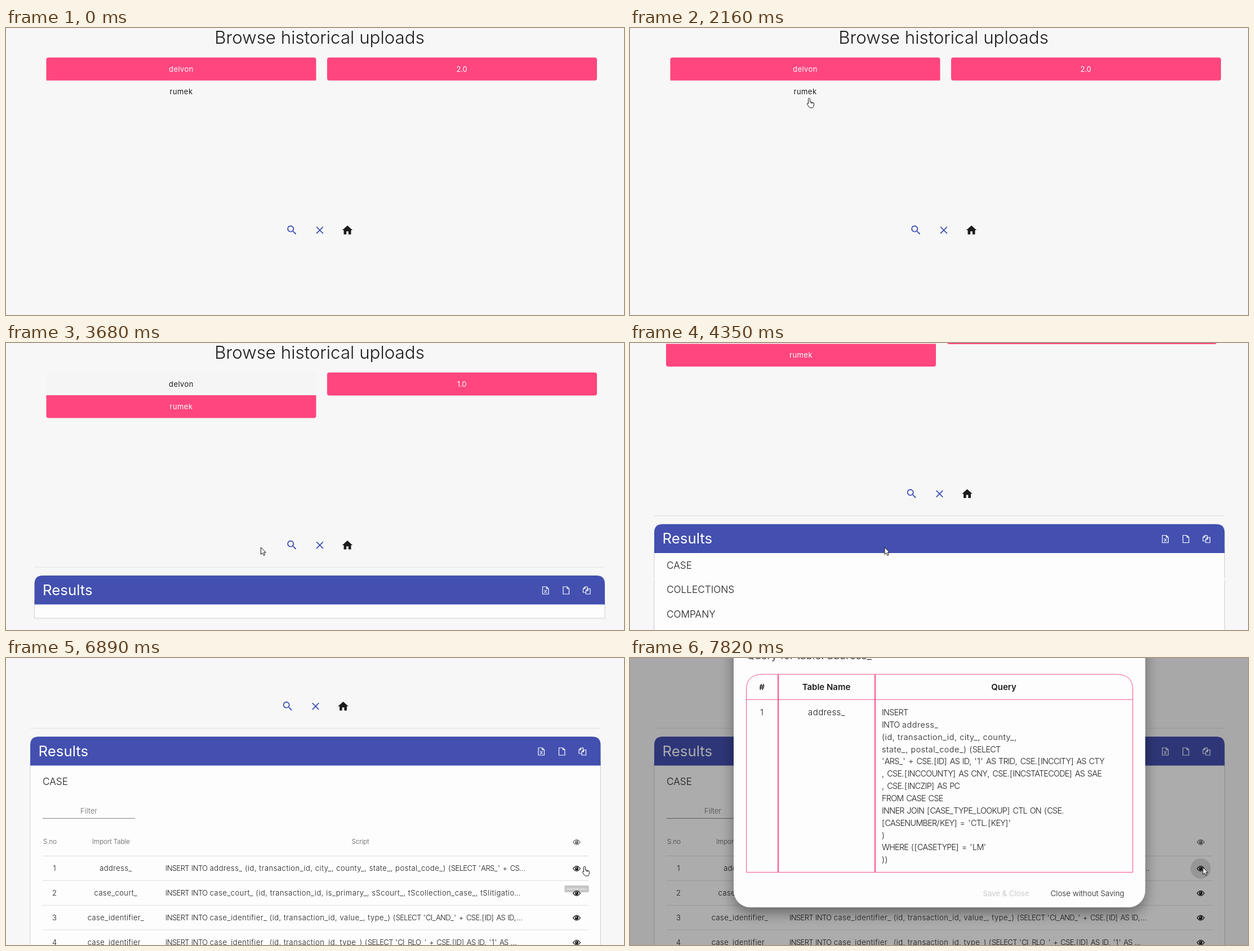
These frames come from a looping animation (1097 px wide and 511 px high, 8000 ms). An HTML page:

```html
<!DOCTYPE html>
<html lang="en">
<head>
<meta charset="utf-8">
<title>Upload history</title>
<style>
  html, body { margin: 0; width: 100%; height: 100%; overflow: hidden; background: #f7f7f7; }
  svg { display: block; width: 1097px; height: 511px; font: 300 13px Inter, "Open Sans", sans-serif; fill: #1c1c1c; }
  .mid { text-anchor: middle; }
  .pink { fill: #ff467e; }
  .title { font-size: 31.3px; }
  .card { font-size: 13px; font-weight: 400; letter-spacing: .45px; }
  .on { fill: #fff; }
  .tight { letter-spacing: -.2px; }
  .results { font-size: 25.8px; font-weight: 400; fill: #fff; }
  .row { font-size: 17.2px; }
  .name { letter-spacing: .45px; }
  .filter { fill: #6a6a6a; }
  .head { font-size: 11.5px; fill: #555; }
  .code { letter-spacing: .04em; }
  .code tspan { letter-spacing: -.05em; }
  .sql { font-size: 14.4px; }
  .line { stroke: #dedede; fill: none; }
  .icon { fill: none; stroke: #fff; stroke-width: 1.2; }
  .tip text { font-size: 9.5px; font-weight: 400; fill: #fff; text-anchor: middle; }
  .tip rect { fill: #616161; }
  .frame { fill: none; stroke: #f8508a; }
  .query { font-size: 19px; }
  .cell { font-size: 15px; }
  .strong { font-size: 15px; font-weight: 600; }
  .button { font-size: 13.4px; }
  .off { fill: #bdbdbd; }
  .cursor path { fill: #fff; stroke: #111; stroke-linejoin: round; }
</style>
</head>
<body>
<svg id="stage" viewBox="0 0 1097 511"></svg>
<script>
const text = (x, y, s, cls = '') => `<text x="${x}" y="${y}" class="${cls}">${s}</text>`;
const rect = (x, y, w, h, attrs = '') => `<rect x="${x}" y="${y}" width="${w}" height="${h}" ${attrs}/>`;
const path = (d, attrs = '') => `<path d="${d}" ${attrs}/>`;
const group = (id, body, attrs = '') => `<g id="${id}" ${attrs}>${body}</g>`;
// Capitals are set tighter than the rest of a statement.
const code = (x, y, s, cls = '') => text(x, y, s.replace(/[A-Z]{2,}/g, '<tspan>$&</tspan>'), 'code ' + cls);
const tip = (id, w, label) => group(id, rect(-w / 2, 0, w, 24, 'rx="4"') + text(0, 15.4, label), 'class="tip"');
const eye = (y, color) => `<g transform="translate(1013 ${y})" fill="${color}">` +
  path('M-6.4 0Q0 -8.6 6.4 0Q0 8.6 -6.4 0z', `fill="none" stroke="${color}" stroke-width="1.2"`) +
  '<circle r="3.1"/><circle cx="-.8" cy="-1" r=".9" fill="#fff"/></g>';
const sheet = 'M-5 -6.5H2L5.5 -3V6.5H-5zM2 -6.5V-3H5.5';

const ROW = 43.85, TOP = 191.5;
const topics = ['COLLECTIONS', 'COMPANY', 'COURTS', 'DEBTOR_PAYMENTS', 'EVENT', 'INSURANCE', 'PARTIES'];
const scripts = [
  ['address_', "(id, transaction_id, city_, county_, state_, postal_code_) (SELECT 'ARS_' + CS…"],
  ['case_court_', '(id, transaction_id, is_primary_, sScourt_, tScollection_case_, tSlitigatio…'],
  ['case_identifier_', "(id, transaction_id, value_, type_) (SELECT 'CI_AND_' + CSE.[ID] AS ID,…"],
  ['case_identifier_', "(id, transaction_id, type_) (SELECT 'CI_RLO_' + CSE.[ID] AS ID, '1' AS …"]
];
const query = [
  'INSERT', 'INTO address_', '(id, transaction_id, city_, county_,', 'state_, postal_code_) (SELECT',
  "'ARS_' + CSE.[ID] AS ID, '1' AS TRID, CSE.[INCCITY] AS CTY",
  ', CSE.[INCCOUNTY] AS CNY, CSE.[INCSTATECODE] AS SAE', ', CSE.[INCZIP] AS PC', 'FROM CASE CSE',
  'INNER JOIN [CASE_TYPE_LOOKUP] CTL ON (CSE.', "[CASENUMBER/KEY] = 'CTL.[KEY]'", ')',
  "WHERE ([CASETYPE] = 'LM'", '))'
];

const roundTop = 'M71.5 93.5V56.5q0 -4 4 -4H546.5q4 0 4 4V93.5z';
const roundBottom = 'M71.5 93V129.5q0 4 4 4H546.5q4 0 4 -4V93z';
const names = (a, b) => text(311, 77.5, 'delvon', 'mid card ' + a) + text(311, 117.5, 'rumek', 'mid card ' + b);

const uploads =
  text(556.5, 28, 'Browse historical uploads', 'mid title') +
  group('first', path(roundTop, 'class="pink"') + names('on', '')) +
  group('second', path(roundTop, 'fill="#f5f5f5"') + path(roundBottom, 'class="pink"') + names('', 'on')) +
  rect(570, 52.5, 479, 41, 'rx="4" class="pink"') +
  text(809, 77.5, '2.0', 'mid card on tight" id="version') +
  '<circle id="press" cx="507" cy="360" r="17" fill="#000" opacity=".06"/>' +
  path('M15.5 14h-.79l-.28-.27A6.5 6.5 0 1 0 9.5 16c1.61 0 3.09-.59 4.23-1.57l.27.28v.79l5 4.99L20.49 19zm-6 0a4.5 4.5 0 1 1 0-9 4.5 4.5 0 0 1 0 9z',
    'fill="#3f51b5" transform="translate(496.5 348.8) scale(.92)"') +
  path('M551.2 354.2l11.6 11.6m0 -11.6l-11.6 11.6', 'stroke="#3f51b5" stroke-width="1.8"') +
  path('M10 20v-6h4v6h5v-8h3L12 3 2 12h3v8z', 'transform="translate(595 349) scale(.92)"');

const table =
  text(147, 276.5, 'Filter', 'mid filter') + path('M65 285.5H229', 'stroke="#858585"') +
  text(78, 331, 'S.no', 'mid head') + text(186.5, 331, 'Import Table', 'mid head') + text(629, 331, 'Script', 'mid head') +
  eye(328, '#666') +
  scripts.map(([name, rest], i) => {
    const y = 375 + i * ROW;
    return path(`M65 ${y - 22.5}H1034`, 'class="line"') + text(86, y + 4, i + 1, 'mid') +
      text(195, y + 4, name, 'mid name') + code(283, y + 4, `INSERT INTO ${name} ${rest}`) + eye(y, '#111');
  }).join('') +
  '<circle id="ripple" cx="1013" cy="375" r="18" fill="#000" opacity=".13"/>';

const rest =
  rect(43, TOP + ROW, 1012.5, 700, 'fill="#fdfdfd"') +
  path(`M43 ${TOP + ROW + 5}V900M1055.5 ${TOP + ROW + 5}V900`, 'stroke="#cfcfcf"') +
  topics.map((s, i) => text(65, TOP + ROW * (i + 1) + 27.5, s, 'row')).join('') +
  path(`M43 ${TOP + ROW - 3}q0 3 3 3H1052.5q3 0 3 -3`, 'id="edge" fill="none" stroke="#aaa"');

const results =
  path('M43 125H1055.5', 'class="line"') +
  '<rect id="sheet" x="43" y="185" width="1012.5" fill="#fdfdfd" stroke="#cfcfcf"/>' +
  group('list', group('table', table) + text(65, 219, 'CASE', 'row" id="case') + group('rest', rest) +
    rect(43, TOP, 1012.5, ROW, 'id="hover" fill="#000" opacity=".03"')) +
  path('M43 191.5V155q0 -15 15 -15H1040.5q15 0 15 15V191.5z', 'fill="#4350af"') +
  text(57.5, 174.5, 'Results', 'results') +
  '<g class="icon">' + path(sheet + 'M-2 -1L2.4 4.5M2.4 -1L-2 4.5', 'transform="translate(950 166.5)"') +
  path(sheet, 'transform="translate(986.5 166.5)"') +
  path('M1.5 -3V-6.5H-2.5L-6 -3V3.5H-1M-2.5 -6.5V-3H-6M2.5 -3H6.5V6.5H-1V.5zM2.5 -3V.5H-1', 'transform="translate(1023 166.5)"') + '</g>';

const modal =
  rect(184, -70, 730.5, 514, 'rx="30" fill="#fdfdfd" filter="url(#shade)"') +
  text(207, 1.5, 'Query for table: address_', 'query') +
  '<g class="frame">' + path('M206.5 381.5V56q0 -27 30 -27H862.5q30 0 30 27V381.5zM206.5 74H892.5') +
  path('M263 29V381M435 29V381', 'stroke-width="2"') + '</g>' +
  text(234, 56.5, '#', 'mid strong') + text(348.5, 56.5, 'Table Name', 'mid strong') + text(663.5, 56.5, 'Query', 'mid strong') +
  text(234, 102, '1', 'mid cell') + text(349, 102, 'address_', 'mid cell name') +
  query.map((s, i) => code(447, 102 + i * 21.85, s, 'sql')).join('') +
  text(667.5, 424, 'Save &amp; Close', 'mid button off') + text(812, 424, 'Close without Saving', 'mid button');

const stage = document.getElementById('stage');
stage.innerHTML =
  '<defs><filter id="shade" x="-10%" y="-10%" width="120%" height="120%"><feDropShadow dx="0" dy="10" stdDeviation="12" flood-opacity=".4"/></filter></defs>' +
  rect(0, 0, 1097, 511, 'fill="#f7f7f7"') +
  group('page', uploads + group('results', results, 'transform="translate(7.5 274)"')) +
  tip('findTip', 79.5, 'Search history') + tip('clearTip', 74, 'Clear search') + tip('viewTip', 84, 'View/Edit query') +
  rect(0, 0, 1097, 511, 'id="veil" fill="#000"') + group('modal', modal) +
  group('cursor',
    path('M0 0V12.5l3 -2.8 2 4.6 2.2 -1 -2 -4.4H9z', 'id="arrow"') +
    path('M-1.5 10V1.5a1.5 1.5 0 0 1 3 0V6.5l5.4 1.2q1.8 .4 1.6 2.4l-.5 3.5q-.3 2.3 -1.8 3.4h-4.6q-1.2 -.4 -2.2 -2l-3 -4.4q-.4 -1.8 1.2 -1.5zM3.6 7V9.5M5.8 7.6V9.8', 'id="hand"'),
    'class="cursor"');

const el = {};
stage.querySelectorAll('[id]').forEach(n => el[n.id] = n);

const ramp = (t, a, b) => Math.min(1, Math.max(0, (t - a) / (b - a)));
const smooth = (t, a, b) => { const k = ramp(t, a, b); return k * k * (3 - 2 * k); };
const fade = (t, a, b) => Math.min(ramp(t, a, a + 150), 1 - ramp(t, b - 75, b));
const during = (t, a, b) => t >= a && t < b;
const show = (node, on) => node.style.display = on ? '' : 'none';
const move = (node, x, y, s = 1) => node.setAttribute('transform', `translate(${x} ${y}) scale(${s})`);

// Pointer stops: time, x, y.
const stops = [
  [100, 726, 186], [420, 710, 250], [640, 604, 270], [850, 452, 130], [1260, 509, 365], [1480, 509, 365],
  [1700, 546, 340], [2130, 318, 125], [2500, 318, 125], [3100, 502, 364], [3500, 502, 364], [3680, 452, 364],
  [4440, 452, 364], [4520, 424, 270], [5010, 328, 346], [5530, 324, 207], [6080, 324, 207], [6540, 1073, 338],
  [6860, 1027, 371], [7200, 1017, 373]
];

// The pointer is sampled every 110 ms.
function pointer(time) {
  const t = 40 + Math.floor((time - 40) / 110) * 110;
  const i = stops.findLastIndex(s => t >= s[0]);
  if (i < 0) return null;
  const [a, x, y] = stops[i], [b, u, v] = stops[i + 1] || [a + 1, x, y];
  const k = smooth(t, a, b);
  return [x + (u - x) * k, y + (v - y) * k];
}

function overTarget(t, [x, y]) {
  const near = (cx, cy) => Math.hypot(x - cx, y - cy) < 24;
  if (t < 3650) return near(507, 360) || near(557, 360) || (x < 550 && y < 128);
  if (t < 6080) return t > 4900 && y > TOP;
  return t < 7540 && near(1013, 375);
}

function setTip(node, x, y, k) {
  node.style.opacity = .9 * k;
  move(node, x, y, .2 + .8 * k);
}

function draw(t) {
  const swapped = t >= 2269, listed = t >= 4220;
  show(el.first, !swapped);
  show(el.second, swapped);
  el.version.textContent = swapped ? '1.0' : '2.0';
  show(el.press, during(t, 3500, 3680));
  const scroll = 91.5 * smooth(t, 4180, 4340) + 182.5 * smooth(t, 4700, 5010);
  move(el.page, listed ? -7.5 : 0, listed ? -scroll : 0);

  show(el.results, t >= 3500);
  show(el.list, listed);
  el.sheet.setAttribute('height', listed ? 700 : 31);

  const open = ramp(t, 5815, 6065) ** 3;
  move(el.rest, 0, 600 * open);
  move(el.case, 0, 7 * open);
  show(el.table, open);
  show(el.edge, open);
  show(el.ripple, t >= 7400);

  setTip(el.findTip, 507.7, 390, Math.max(fade(t, 1300, 1580), fade(t, 2990, 3360)));
  setTip(el.clearTip, 557, 390, fade(t, 1580, 1830));
  setTip(el.viewTip, 1013, 405, fade(t, 6832, 7415));

  const size = .7 + .3 * smooth(t, 7620, 7810);
  el.veil.style.opacity = .32 * ramp(t, 7500, 7800);
  el.modal.style.opacity = ramp(t, 7620, 7760);
  move(el.modal, 549 * (1 - size), 190 * (1 - size), size);

  const p = pointer(t);
  show(el.cursor, p);
  show(el.hover, false);
  if (!p) return;
  move(el.cursor, ...p);
  const hand = overTarget(t, p);
  show(el.hand, hand);
  show(el.arrow, !hand);
  const row = Math.floor((p[1] - TOP) / ROW);
  show(el.hover, during(t, 5010, 5750) && row > 0);
  el.hover.setAttribute('y', TOP + row * ROW);
}

const start = performance.now();
function tick() {
  draw((performance.now() - start) % 8000);
  requestAnimationFrame(tick);
}
tick();
</script>
</body>
</html>
```
